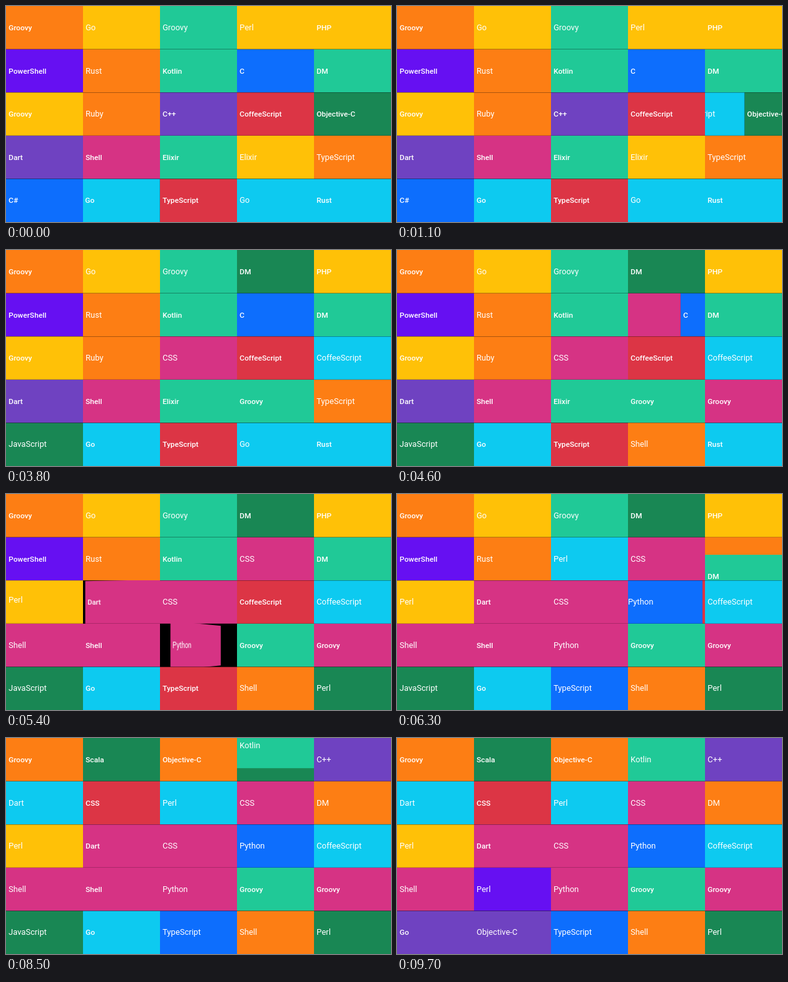
Animation, 600 px wide and 338 px high, one loop 9800 ms. Source, as an HTML page:

```html
<!DOCTYPE html>
<html>
<head>
<meta charset="utf-8">
<style>
html, body { margin: 0; width: 100%; height: 100%; overflow: hidden; background: #000; }
#grid { position: relative; width: 600px; height: 338px; overflow: hidden; }
/* One pixel taller than a row, so the next row blends over its lower edge. */
.cell { position: absolute; width: 120px; height: 68.6px; overflow: hidden; background: #000; }
.face {
  position: absolute; inset: 0; padding-left: 4px; box-sizing: border-box;
  color: #fff; font-family: Roboto, sans-serif; line-height: 68.6px; white-space: nowrap;
}
.small { font-size: 11.7px; font-weight: 500; }
.large { font-size: 12.65px; }
</style>
</head>
<body>
<div id="grid"></div>
<script>
const LOOP = 9800, STEP = 100, DURATION = 500, ROW = 67.6, COLUMN = 120;
const COLORS = {
  o: '#fd7e14', y: '#ffc107', t: '#20c997', i: '#6610f2', b: '#0d6efd',
  u: '#6f42c1', p: '#d63384', r: '#dc3545', g: '#198754', c: '#0dcaf0'
};

// Each tile is a colour letter and a label; a capital letter means larger type.
const START = [
  'o Groovy', 'Y Go', 'T Groovy', 'Y Perl', 'y PHP',
  'i PowerShell', 'O Rust', 't Kotlin', 'b C', 't DM',
  'y Groovy', 'O Ruby', 'u C++', 'r CoffeeScript', 'g Objective-C',
  'u Dart', 'p Shell', 't Elixir', 'Y Elixir', 'O TypeScript',
  'b C#', 'c Go', 'r TypeScript', 'C Go', 'c Rust'
];

// start time, row, column, move, new tile
const CHANGES = [
  [-445, 4, 1, 'right', 'c Go'],
  [950, 2, 4, 'right', 'C CoffeeScript'],
  [1500, 2, 2, 'down', 'P CSS'],
  [2077, 0, 3, 'right', 'g DM'],
  [2700, 3, 3, 'down', 't Groovy'],
  [3200, 4, 0, 'right', 'G JavaScript'],
  [3850, 3, 4, 'right', 'p Groovy'],
  [4150, 4, 3, 'down', 'O Shell'],
  [4400, 1, 3, 'right', 'P CSS'],
  [4650, 3, 0, 'down', 'P Shell'],
  [4800, 4, 4, 'right', 'G Perl'],
  [5025, 2, 0, 'down', 'Y Perl'],
  [5065, 2, 1, 'flipRight', 'p Dart'],
  [5185, 3, 2, 'flipLeft', 'P Python'],
  [5480, 1, 2, 'right', 'C Perl'],
  [5700, 4, 2, 'down', 'B TypeScript'],
  [5915, 2, 3, 'right', 'B Python'],
  [6178, 1, 4, 'down', 'O DM'],
  [6420, 1, 0, 'down', 'C Dart'],
  [6700, 0, 1, 'down', 'g Scala'],
  [6950, 0, 4, 'right', 'U C++'],
  [7650, 1, 1, 'down', 'r CSS'],
  [8000, 0, 2, 'right', 'o Objective-C'],
  [8300, 0, 3, 'down', 'T Kotlin'],
  [8600, 3, 1, 'right', 'I Perl'],
  [8850, 4, 1, 'down', 'U Objective-C'],
  [9200, 4, 0, 'right', 'u Go']
];

// cubic-bezier(.25, .1, .25, 1)
function ease(x) {
  const bezier = (a, b, s) => 3 * a * s * (1 - s) ** 2 + 3 * b * s * s * (1 - s) + s ** 3;
  if (x >= 1) return 1;
  let low = 0, high = 1;
  for (let n = 0; n < 24; n++) {
    const mid = (low + high) / 2;
    if (bezier(.25, .25, mid) < x) low = mid; else high = mid;
  }
  return bezier(.1, 1, low);
}

function addDiv(parent, className) {
  const div = document.createElement('div');
  div.className = className;
  parent.append(div);
  return div;
}

function paint(face, tile, transform) {
  face.style.display = tile ? '' : 'none';
  if (!tile) return;
  const code = tile[0], key = code.toLowerCase();
  face.textContent = tile.slice(2);
  face.className = code === key ? 'face small' : 'face large';
  face.style.background = COLORS[key];
  face.style.transform = transform;
}

const cells = START.map((tile, n) => {
  const row = Math.floor(n / 5), column = n % 5;
  const box = addDiv(grid, 'cell');
  box.style.transform = `translate(${column * COLUMN}px, ${row * ROW}px)`;
  return {
    tile,
    changes: CHANGES.filter(c => c[1] === row && c[2] === column),
    back: addDiv(box, 'face'),
    front: addDiv(box, 'face')
  };
});

function drawCell({ tile, changes, back, front }, time) {
  let old = null, current = tile, start = -Infinity, move = '';
  for (const change of changes) {
    if (change[0] > time) break;
    old = current;
    [start, , , move, current] = change;
  }
  const p = ease((time - start) / DURATION);
  if (p === 1) {
    paint(back, null);
    paint(front, current, 'none');
  } else if (move.startsWith('flip')) {
    const turn = (move === 'flipLeft' ? -180 : 180) * (p < .5 ? p : p - 1);
    paint(back, null);
    paint(front, p < .5 ? old : current, `perspective(400px) rotateY(${turn}deg)`);
  } else {
    const axis = move === 'right' ? 'X' : 'Y';
    paint(back, old, `translate${axis}(${p * 100}%)`);
    paint(front, current, `translate${axis}(${(p - 1) * 100}%)`);
  }
}

function frame() {
  const time = Math.floor(performance.now() % LOOP / STEP) * STEP;
  cells.forEach(cell => drawCell(cell, time));
  requestAnimationFrame(frame);
}
frame();
</script>
</body>
</html>
```
